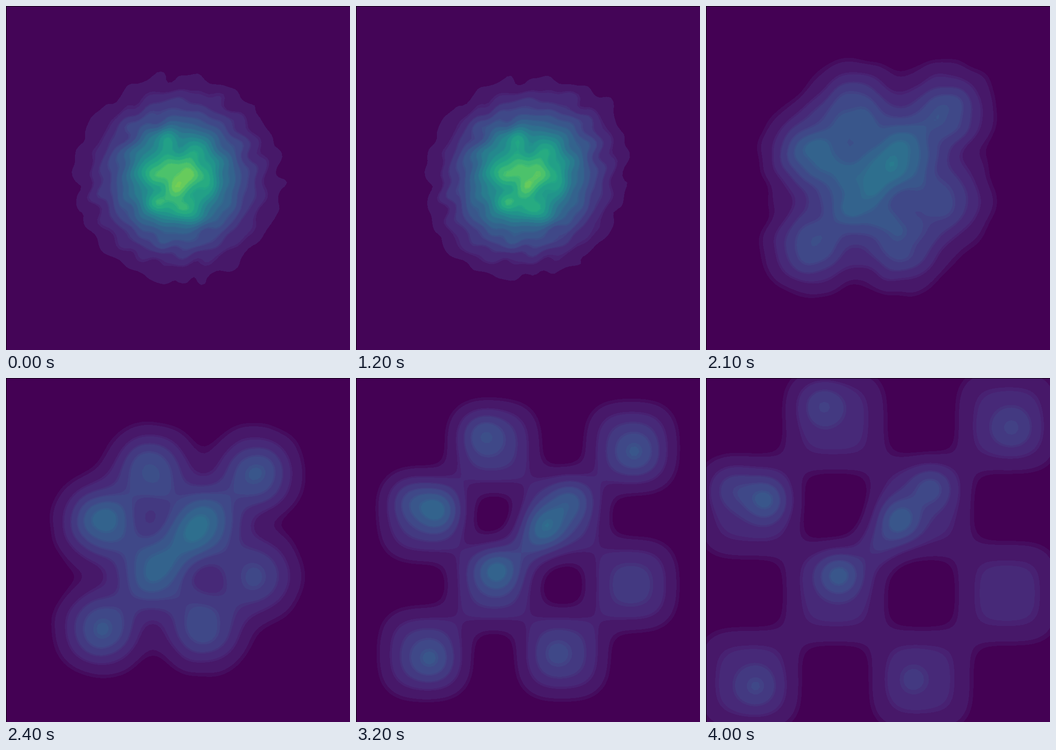
These frames come from a looping animation (748 by 748 pixels, 4100 ms). An HTML page with a canvas:

```html
<!DOCTYPE html>
<html lang="en">
<head>
<meta charset="utf-8">
<title>Density flow</title>
<style>
  html, body { margin: 0; width: 100%; height: 100%; overflow: hidden; background: #440154; }
  canvas { display: block; }
</style>
</head>
<body>
<canvas id="view" width="748" height="748"></canvas>
<script>
const SIZE = 748, MID = SIZE / 2, UNIT = SIZE / 8;
const STEP_MS = 100, STEPS = 41;
const GRID = 8, NODES = Math.ceil(SIZE / GRID) + 1;
const BAND = 0.05, FIRST = 0.038;

// Key dense spots of the final checkerboard: x, y, height
const spots = [
  [255, 60, .085], [664, 108, .085], [130, 265, .15], [58, 240, .07],
  [420, 308, .17], [488, 238, .11], [372, 362, .08], [288, 428, .16],
  [108, 670, .09], [448, 655, .045]
];

// Key clumps near the middle of the starting cloud: x, y, height
const clumps = [
  [352, 354, .07], [372, 392, .09], [404, 366, .07], [438, 378, .06],
  [306, 350, .09], [328, 434, .12], [390, 444, .13], [425, 317, .1], [347, 285, .08]
];

const stops = ['440154', '482475', '414487', '355f8d', '2a788e', '21918c',
  '22a884', '44bf70', '7ad151', 'bddf26', 'fde725']
  .map(h => [0, 2, 4].map(i => parseInt(h.slice(i, i + 2), 16)));

function viridis(v) {
  const p = Math.min(Math.max(v, 0), 1) * 10, i = Math.min(9, Math.floor(p));
  const [r, g, b] = stops[i].map((c, k) => Math.round(c + (stops[i + 1][k] - c) * (p - i)));
  return (255 << 24 | b << 16 | g << 8 | r) >>> 0;
}

// Wide bands, each followed by a thin in-between one
function bandColor(v, faintRim) {
  if (v < FIRST) return viridis(!faintRim ? 0.01 : v > 0.027 ? 0.03 : 0);
  const q = (v - FIRST) / BAND, k = Math.floor(q);
  return viridis(0.065 + BAND * (k + (q - k > 0.8 ? 0.5 : 0)));
}

const LUT_SIZE = 1200;
const makeLut = faintRim => Uint32Array.from({ length: LUT_SIZE },
  (_, i) => bandColor(i / 1000, faintRim));
const earlyLut = makeLut(false), lateLut = makeLut(true);

let seed = 11;
function random() {
  seed = (seed * 1664525 + 1013904223) >>> 0;
  return seed / 4294967296;
}
const waves = Array.from({ length: 30 }, () => {
  const angle = random() * Math.PI * 2, k = Math.PI * 2 / (40 + 45 * random());
  return [k * Math.cos(angle), k * Math.sin(angle), random() * Math.PI * 2];
});
const noise = (x, y) => waves.reduce((s, [a, b, c]) => s + Math.cos(a * x + b * y + c), 0)
  * Math.sqrt(2 / waves.length);

const normalCdf = z => 1 / (1 + Math.exp(-1.5976 * z - 0.07056 * z * z * z));
const smooth = x => { x = Math.min(Math.max(x, 0), 1); return x * x * (3 - 2 * x); };

const field = new Float32Array(NODES * NODES);

function eachNode(fn) {
  for (let j = 0, k = 0; j < NODES; j++) {
    for (let i = 0; i < NODES; i++, k++) fn(k, i, j);
  }
}

// Adds round bumps whose places are scaled about the middle
function addBumps(list, zoom, gain, sd) {
  for (const [x, y, height] of list) {
    const cx = MID + (x - MID) * zoom, cy = MID + (y - MID) * zoom;
    eachNode((k, i, j) => {
      const d2 = (i * GRID - cx) ** 2 + (j * GRID - cy) ** 2;
      if (d2 < 16 * sd * sd) field[k] += height * gain * Math.exp(-d2 / (2 * sd * sd));
    });
  }
}

// Density of (1 - t) * normal + t * checkerboard, with kernel smoothing
const cloudVar = t => (1 - t) ** 2 + 5.33 * t * t;
const blurVar = t => (1 - t) ** 2 + 0.0225 * cloudVar(t);
const spotVar = t => 0.01 * t * t + blurVar(t);

function computeField(time) {
  const t = Math.max(time, 0.02), sd = Math.sqrt(blurVar(t));
  const spread = Math.sqrt(cloudVar(time));

  const profile = [0, 1, 2, 3].map(c => Float64Array.from({ length: NODES }, (_, i) => {
    const x = (i * GRID - MID) / UNIT, left = (c * 2 - 4) * t;
    return (normalCdf((x - left) / sd) - normalCdf((x - left - 2 * t) / sd)) / (2 * t);
  }));
  eachNode((k, i, j) => {
    let sum = 0;
    for (let r = 0; r < 4; r++) {
      const c = 1 - r % 2;
      sum += (profile[c][i] + profile[c + 2][i]) * profile[r][j];
    }
    field[k] = sum * 0.42;
  });
  addBumps(spots, time, spotVar(1) / spotVar(time), Math.sqrt(spotVar(time)) * UNIT);

  // Sampling noise drifts with the cloud and fades as it opens up
  const rough = 1 - smooth((time - 0.3) / 0.45);
  if (rough <= 0) return;
  eachNode((k, i, j) => {
    if (field[k] < 0.006) return;
    const n = noise((i * GRID - MID) / spread, (j * GRID - MID) / spread);
    field[k] += 0.028 * rough * n * Math.sqrt(field[k]) / spread;
  });
  addBumps(clumps, spread, rough / spread ** 2, 17 * spread);
}

const ctx = document.getElementById('view').getContext('2d');
const image = ctx.createImageData(SIZE, SIZE);
const pixels = new Uint32Array(image.data.buffer);
const row = new Float32Array(NODES);

function draw(step) {
  const time = step / (STEPS - 1);
  computeField(time);
  const lut = time < 0.35 ? earlyLut : lateLut;
  for (let y = 0, p = 0; y < SIZE; y++) {
    const j = Math.floor(y / GRID), fy = y / GRID - j, base = j * NODES;
    for (let i = 0; i < NODES; i++) {
      const a = field[base + i];
      row[i] = a + (field[base + NODES + i] - a) * fy;
    }
    for (let x = 0; x < SIZE; x++, p++) {
      const i = Math.floor(x / GRID), v = row[i] + (row[i + 1] - row[i]) * (x / GRID - i);
      pixels[p] = lut[Math.min(LUT_SIZE - 1, Math.max(0, Math.floor(v * 1000)))];
    }
  }
  ctx.putImageData(image, 0, 0);
  ctx.fillStyle = '#000';
  ctx.fillRect(0, 0, SIZE, 1);
  ctx.fillRect(0, 0, 1, SIZE);
}

const start = performance.now();
let shown = -1;
function tick() {
  const step = Math.floor((performance.now() - start) / STEP_MS) % STEPS;
  if (step !== shown) draw(shown = step);
  requestAnimationFrame(tick);
}
tick();
</script>
</body>
</html>
```
